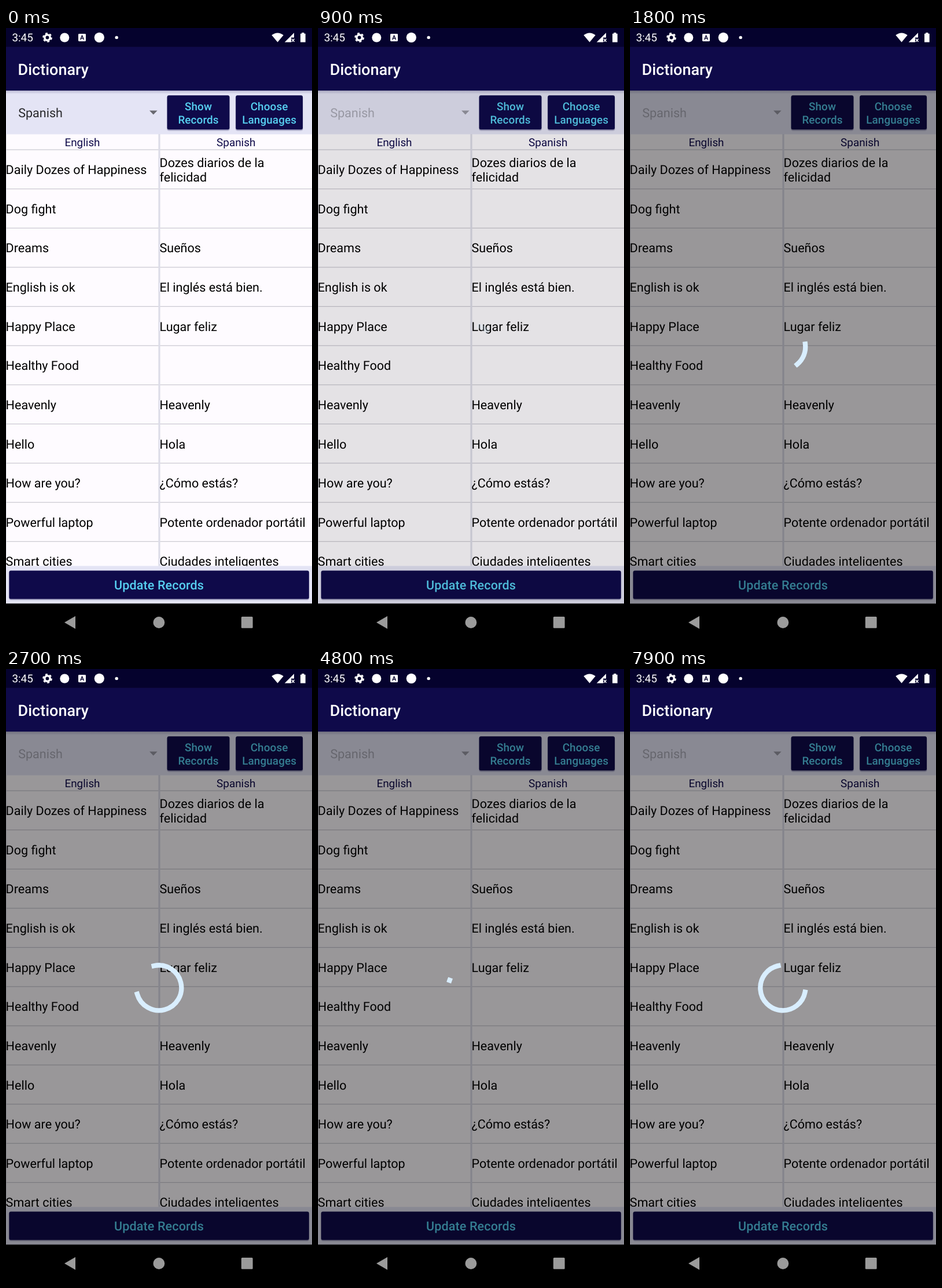
An HTML page for the animation above (8 s loop, 529x1058 px).

```html
<!DOCTYPE html>
<html lang="en">
<head>
<meta charset="utf-8">
<title>Dictionary</title>
<style>
  html, body { margin: 0; width: 100%; height: 100%; overflow: hidden; background: #000; }
  svg { display: block; width: 100%; height: 100%; }
  text { font-family: Roboto, sans-serif; font-size: 21.55px; text-rendering: geometricPrecision; white-space: pre; }
  .title { font-size: 26.94px; font-weight: 500; fill: #fff; }
  .small { font-size: 18.86px; }
  .button { font-weight: 500; fill: #57d0f1; letter-spacing: .12px; text-anchor: middle; }
  .head { fill: #0f0a4a; text-anchor: middle; }
</style>
</head>
<body>
<svg viewBox="0 0 529 1058" preserveAspectRatio="none">
  <defs>
    <linearGradient id="shade" x2="0" y2="1">
      <stop offset="0" stop-color="#0f0a4a" stop-opacity=".2"/>
      <stop offset="1" stop-color="#0f0a4a" stop-opacity="0"/>
    </linearGradient>
    <clipPath id="list"><rect y="183" width="529" height="745.5"/></clipPath>
  </defs>

  <rect width="529" height="1058" fill="#000"/>
  <rect y="108" width="529" height="885.3" fill="#e4e4f5"/>
  <rect y="108" width="529" height="6" fill="url(#shade)"/>

  <text id="choice" x="21.2" y="153.6">Spanish</text>
  <path id="arrow" d="M248 142.6h13.6l-6.8 6.9z"/>
  <g id="buttons"></g>
  <g id="table" clip-path="url(#list)"></g>

  <rect id="dim" y="108" width="529" height="885.3"/>
  <path id="arc" fill="none" stroke="#d9eeff" stroke-width="8.3" stroke-linecap="square"/>

  <rect width="529" height="32.4" fill="#05022d"/>
  <rect y="32.3" width="529" height="75.7" fill="#0f0a4a"/>
  <text class="title" x="20.6" y="80.8">Dictionary</text>

  <g fill="#fff">
    <text class="small" x="10.4" y="23.3">3:45</text>
    <circle cx="71.5" cy="16.5" r="4.7" fill="none" stroke="#fff" stroke-width="3.6"/>
    <circle cx="71.5" cy="16.5" r="7.1" fill="none" stroke="#fff" stroke-width="2.6" stroke-dasharray="3.72 3.72"/>
    <circle cx="101.3" cy="16.5" r="8"/>
    <rect x="125" y="10" width="13" height="13" rx="1.4"/>
    <text x="131.5" y="20.4" text-anchor="middle" style="font-size:10.5px;font-weight:700;fill:#05022d">A</text>
    <circle cx="161.3" cy="16.3" r="8.6"/>
    <circle cx="191.2" cy="16.4" r="2.7"/>
    <path d="M459.3 12.2q10.2-7.6 20.4 0L469.5 24.6z"/>
    <path d="M498 8.2v8.3h-5v8h-11.3z"/>
    <path d="M494 18.8l4.5 5m0-5l-4.5 5" stroke="#fff" stroke-width="1.5"/>
    <path d="M509 9.7h2.2V8h4.2v1.7h2.3v14.9H509z"/>
  </g>

  <g fill="#9b9b9b">
    <path d="M101 1026l19-11v22z"/>
    <circle cx="264.4" cy="1026" r="9.9"/>
    <rect x="406.8" y="1016" width="19.8" height="19.8" rx="1.6"/>
  </g>
</svg>
<script>
const LOOP = 8000, STEP = 100;
const OPEN = 870, FADE = 120;        // overlay fade-in
const SPIN = 795, CYCLE = 1333;      // spinner start and sweep period
const CX = 264.3, CY = 550.3, R = 39;

const $ = id => document.getElementById(id);

function add(parent, tag, attrs, text) {
  const el = document.createElementNS('http://www.w3.org/2000/svg', tag);
  for (const key in attrs) el.setAttribute(key, attrs[key]);
  if (text) el.textContent = text;
  parent.appendChild(el);
  return el;
}

function button(x, y, w, h, lines, size, base) {
  const g = $('buttons');
  add(g, 'rect', { x: x - .5, y: y + 1, width: w + 1, height: h + 1.2, rx: 4, fill: '#0f0a4a', opacity: .25 });
  add(g, 'rect', { x, y, width: w, height: h, rx: 3, fill: '#0f0a4a' });
  lines.forEach((line, i) => add(g, 'text',
    { class: 'button ' + size, x: x + w / 2, y: base + i * 22.3 }, line));
}

const rows = [
  ['Daily Dozes of Happiness', 'Dozes diarios de la|felicidad'],
  ['Dog fight', ''],
  ['Dreams', 'Sueños'],
  ['English is ok', 'El inglés está bien.'],
  ['Happy Place', 'Lugar feliz'],
  ['Healthy Food', ''],
  ['Heavenly', 'Heavenly'],
  ['Hello', 'Hola'],
  ['How are you?', '¿Cómo estás?'],
  ['Powerful laptop', 'Potente ordenador portátil'],
  ['Smart cities', 'Ciudades inteligentes']
];

function cell(x, y, text) {
  const lines = text.split('|');
  lines.forEach((line, i) => add($('table'), 'text',
    { x, y: y + (i - (lines.length - 1) / 2) * 25.3 }, line));
}

function buildTable() {
  const g = $('table'), pitch = 67.62;
  add(g, 'rect', { y: 183.4, width: 529, height: 746, fill: '#fefbff' });
  for (let i = 0; i < rows.length; i++)
    add(g, 'rect', { y: 209.5 + i * pitch, width: 529, height: 1.2, fill: '#c9c8d0' });
  add(g, 'rect', { y: 183, width: .8, height: 746, fill: '#d4d4de' });
  add(g, 'rect', { x: 263.4, y: 183, width: 3.2, height: 746, fill: '#dcdce8' });
  add(g, 'text', { class: 'head small', x: 132, y: 204.2 }, 'English');
  add(g, 'text', { class: 'head small', x: 397.7, y: 204.2 }, 'Spanish');
  rows.forEach(([left, right], i) => {
    cell(-.4, 252.2 + i * pitch, left);
    cell(265.5, 252.2 + i * pitch, right);
  });
}

const clamp = v => Math.min(1, Math.max(0, v));

// Cubic (0,0) (.2,0) (.1,1) (.5,1), then flat
function sweep(x) {
  if (x <= 0) return 0;
  if (x >= .5) return 1;
  let lo = 0, hi = 1;
  for (let i = 0; i < 24; i++) {
    const s = (lo + hi) / 2, q = 1 - s;
    if (.6 * s * q * q + .3 * s * s * q + .5 * s ** 3 < x) lo = s; else hi = s;
  }
  return lo * lo * (3 - 2 * lo);
}

function arcPath(from, to) {
  const at = turn => {
    const a = turn * 2 * Math.PI;
    return (CX + R * Math.sin(a)).toFixed(3) + ' ' + (CY - R * Math.cos(a)).toFixed(3);
  };
  return `M${at(from)}A${R} ${R} 0 ${to - from > .5 ? 1 : 0} 1 ${at(to)}`;
}

function render(time) {
  const t = Math.floor((time % LOOP) / STEP + 1e-6) * STEP;
  const shown = clamp((t - OPEN) / FADE), busy = shown > 0;
  $('dim').setAttribute('opacity', .4 * shown);
  $('choice').setAttribute('fill-opacity', busy ? .26 : .82);
  $('arrow').setAttribute('fill-opacity', busy ? .33 : .54);

  const spin = Math.max(0, t - SPIN), p = spin / CYCLE % 1;
  const base = 2 * spin / 4444 + p / 4;
  const start = base + .75 * sweep(p - .5);
  const end = Math.max(base + .75 * sweep(p), start + .002);
  $('arc').setAttribute('d', arcPath(start, end));
  $('arc').setAttribute('opacity', shown);
}

button(278.6, 116.2, 107.8, 59, ['Show', 'Records'], 'small', 142.2);
button(397.2, 116.2, 115.8, 59, ['Choose', 'Languages'], 'small', 142.2);
button(5.4, 936.4, 518.4, 49, ['Update Records'], '', 969.4);
buildTable();

const begin = performance.now();
function tick() {
  render(performance.now() - begin);
  requestAnimationFrame(tick);
}
tick();
</script>
</body>
</html>
```
